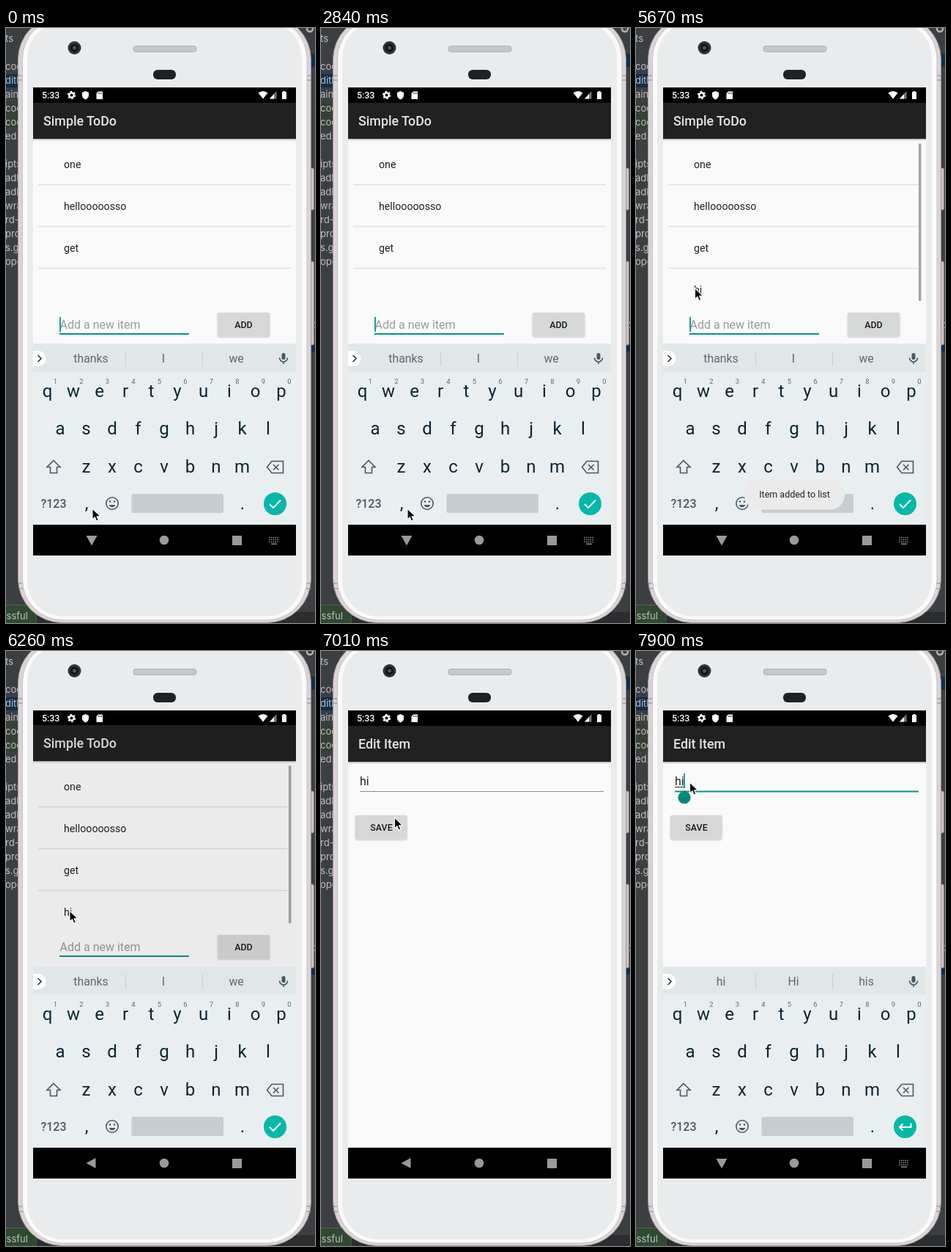
An HTML page for the animation above (8 s loop, 422 px wide and 811 px high).

```html
<!DOCTYPE html>
<html lang="en">
<head>
<meta charset="utf-8">
<title>To-do list on a phone</title>
<style>
  html, body { margin: 0; width: 100%; height: 100%; overflow: hidden; background: #3c3f41; }
  svg { display: block; width: 100%; height: 100%; font-family: Roboto, sans-serif; }
  .mid { text-anchor: middle; }
  .bold { font-weight: 500; }
  .line { fill: none; stroke: #455a64; stroke-width: 1.6; }
  #ide text { font: 13px Inter, sans-serif; fill: #bdbfc1; }
  #list text { font-size: 14.2px; fill: #212121; }
  .field { font-size: 16px; fill: #212121; }
  .button { font-size: 12.4px; font-weight: 500; fill: #1b1b1b; text-anchor: middle; }
  .title { font-size: 17.85px; font-weight: 500; fill: #e4e4e4; }
  #letters { font-size: 24px; fill: #0b2531; text-anchor: middle; }
  #digits { font-size: 9.5px; fill: #5f6d75; text-anchor: middle; }
  #words { font-size: 15.8px; fill: #5c6970; text-anchor: middle; }
</style>
</head>
<body>
<svg viewBox="0 0 422 811">
  <defs>
    <linearGradient id="shade" x2="0" y2="1">
      <stop stop-opacity=".28"/><stop offset="1" stop-opacity="0"/>
    </linearGradient>
    <filter id="lift" x="-10%" y="-20%" width="120%" height="150%">
      <feDropShadow dx="0" dy="1" stdDeviation="1" flood-opacity=".25"/>
    </filter>
    <clipPath id="screen"><rect x="37" y="81" width="359" height="638"/></clipPath>
    <clipPath id="reveal"><rect id="revealBox" x="37" width="359" height="700"/></clipPath>
  </defs>

  <g id="ide">
    <rect width="422" height="811" fill="#3c3f41"/>
    <path d="M0 63h30v18H0zM410 35h12v18h-12zM410 432h12v9h-12z" fill="#0d2f4d"/>
    <path d="M0 100h30v37H0z" fill="#344134"/>
    <rect x="-1" y="786.500" width="43" height="30" fill="#2f4a2f" stroke="#55605a"/>
    <path d="M42 796h380v15H42z" fill="#2b2d2f"/>
    <circle cx="415" cy="1" r="4" fill="none" stroke="#b0b3b5" stroke-width="2.500"/>
    <text x="417" y="409">c</text>
    <text x="-7" y="806">essful</text>
  </g>

  <g id="phone">
    <rect x="411" y="191" width="9.500" height="57" rx="2" fill="#c9c3c4" stroke="#8b8587"/>
    <rect x="411" y="318" width="9.500" height="114" rx="2" fill="#c9c3c4" stroke="#8b8587"/>
    <rect x="16.500" y="-17" width="400" height="827.500" rx="60" fill="#dcd3d6" stroke="#a39a9d"/>
    <path d="M17 65h7M17 71h7M410 65h7M410 71h7M17 757h7M17 764h7M410 757h7M410 764h7" stroke="#8a8285"/>
    <rect x="22.500" y="-13" width="388.500" height="820" rx="55" fill="#fafafa" stroke="#cbc3c6"/>
    <rect x="29" y="-8" width="375" height="810" rx="49" fill="#e9ebec"/>
    <circle cx="93.500" cy="27" r="9" fill="#303234"/>
    <circle cx="93.500" cy="27" r="5.500" fill="#111418"/>
    <circle cx="93.500" cy="27" r="2.500" fill="#4b5562"/>
    <rect x="174" y="24.500" width="86" height="8" rx="3.500" fill="#c7c8ca" stroke="#aeb0b2"/>
    <rect x="201" y="57" width="31" height="13" rx="6" fill="#202124"/>
  </g>

  <g clip-path="url(#screen)">
    <path d="M37 81h359v638H37z"/>
    <g id="main">
      <path d="M37 151h359v540H37z" fill="#fafafa"/>
      <path d="M37 102h359v49H37z" fill="#212121"/>
      <path d="M37 151h359v3H37z" fill="url(#shade)"/>
      <text class="title" x="51" y="133">Simple ToDo</text>
      <g id="list">
        <text x="79" y="191">one</text>
        <text x="79" y="248">hellooooosso</text>
        <text x="79" y="305">get</text>
        <path d="M44 213.500h345M44 270.500h345M44 327.500h345" stroke="#e0e0e0" stroke-width="1.500"/>
        <g id="added">
          <text x="79" y="361.500">hi</text>
          <path d="M386 157.500h3.500v214.500H386z" fill="#a5a5a5"/>
        </g>
      </g>
      <text class="field" id="entry" x="73.500" y="410"></text>
      <path id="composing" d="M74 412.500h11.500" stroke="#333"/>
      <path d="M73 417h177" stroke="#009688" stroke-width="1.800"/>
      <path id="caret" stroke="#009688" stroke-width="1.800"/>
      <rect id="add" x="289" y="388" width="71" height="32.500" rx="2" filter="url(#lift)"/>
      <text class="button" x="324.500" y="409">ADD</text>
      <rect id="dim" x="37" y="102" width="359" height="589"/>
    </g>

    <g clip-path="url(#reveal)">
      <g id="edit">
        <path d="M37 151h359v540H37z" fill="#fafafa"/>
        <path d="M37 102h359v49H37z" fill="#212121"/>
        <path d="M37 151h359v3H37z" fill="url(#shade)"/>
        <text class="title" x="51" y="133">Edit Item</text>
        <text class="field" x="53" y="183">hi</text>
        <path id="editLine" d="M53 191.500h333"/>
        <rect x="47" y="224" width="70.500" height="32.500" rx="2" fill="#d6d7d7" filter="url(#lift)"/>
        <text class="button" x="82.500" y="245">SAVE</text>
        <g id="editFocus">
          <path d="M53 185.500h12" stroke="#333"/>
          <path d="M66 167v20" stroke="#009688" stroke-width="1.800"/>
          <path id="handle" d="M66 190l6 3.500a8.600 8.600 0 1 1-12 0z" fill="#00897b"/>
        </g>
      </g>
    </g>

    <g id="keyboard">
      <path d="M37 430.500h359V678H37z" fill="#e9eef1"/>
      <path d="M37 430.500h359V469H37z" fill="#e1e6e9"/>
      <path d="M37 440h7a10.500 10.500 0 0 1 0 21h-7z" fill="#fff"/>
      <path d="M43.500 446l4.500 4.500-4.500 4.500" class="line" style="stroke:#263238"/>
      <path d="M163.500 440v21M268.500 440v21" stroke="#c8ced2"/>
      <g id="words"></g>
      <rect x="376.500" y="443" width="5" height="9" rx="2.500" fill="#455a64"/>
      <path d="M373.500 449.500a5.500 5.500 0 0 0 11 0M379 455v3" class="line"/>
      <g id="letters"></g>
      <g id="digits"></g>
      <path d="M65 589.500l9 9h-4.500v8h-9v-8H56z" class="line"/>
      <path d="M363 590.500h15.500v16H363l-6.500-8zM365 595l7.500 7.500M372.500 595l-7.500 7.500" class="line"/>
      <text class="mid bold" x="65" y="654" font-size="16" fill="#455a64">?123</text>
      <circle cx="145" cy="648" r="8.200" class="line"/>
      <circle cx="142" cy="645.500" r="1.300" fill="#455a64"/>
      <circle cx="148" cy="645.500" r="1.300" fill="#455a64"/>
      <path d="M140.500 650a4.800 4.800 0 0 0 9 0z" fill="#455a64"/>
      <rect x="171.500" y="635" width="125.500" height="26" rx="2" fill="#c8cdd1"/>
      <circle cx="367.500" cy="648.500" r="15.500" fill="#04b9a9"/>
      <path id="enter" fill="none" stroke="#fff" stroke-width="2"/>
    </g>

    <g id="toast">
      <rect x="148" y="614.500" width="137" height="42" rx="20" fill="#ebebeb"/>
      <text class="mid" x="216.500" y="640" font-size="12.500" fill="#222">Item added to list</text>
    </g>

    <path d="M37 677h359v42H37z"/>
    <path id="back" fill="#9a9a9a"/>
    <circle cx="216" cy="698" r="6.300" fill="#9a9a9a"/>
    <path d="M309 692h13v13h-13z" fill="#9a9a9a"/>
    <g id="switcher" fill="none" stroke="#8a8a8a" stroke-width="1.500" stroke-dasharray="1.600 1.200">
      <path d="M359 694.500h14M359 697.500h14M359 700.500h14"/>
      <path d="M362 703.300h8" stroke-dasharray="none"/>
    </g>

    <g id="status" fill="#fff">
      <text class="bold" x="49" y="96" font-size="12.400">5:33</text>
      <circle cx="89.500" cy="91.500" r="3.200" fill="none" stroke="#fff" stroke-width="2.400"/>
      <circle cx="89.500" cy="91.500" r="4.900" fill="none" stroke="#fff" stroke-width="1.600" stroke-dasharray="2.500 2.630"/>
      <path d="M108.500 86l4.500 2v3.500q0 4-4.500 6-4.500-2-4.500-6V88z"/>
      <path d="M126 86.500h6v10.500h-8.500V89z"/>
      <path d="M126.500 88v2M128.500 88v2M130.500 88v2" stroke="#000" stroke-width=".8"/>
      <path d="M344.500 88.500q6.500-5 13 0L351 96.500z"/>
      <path d="M369.500 86v10.500H360z" fill="#777"/>
      <path d="M366 90v6.500h-6z"/>
      <path d="M377 87.300h1.500V86h3v1.300h1.500V97h-6z"/>
    </g>
  </g>

  <path id="pointer" d="M0 0v14.800l3.400-3.100 2.300 5.400 2.600-1.100-2.200-5.300h4.700z" stroke="#fff" stroke-width="1.100"/>
</svg>

<script>
const LOOP = 8000, TICK = 149;
const $ = id => document.getElementById(id);
const set = (id, attrs) => { for (const k in attrs) $(id).setAttribute(k, attrs[k]); };
const show = (id, on) => { $(id).style.display = on ? '' : 'none'; };

function addText(parent, x, y, content) {
  const node = document.createElementNS('http://www.w3.org/2000/svg', 'text');
  node.setAttribute('x', x);
  node.setAttribute('y', y);
  node.textContent = content;
  $(parent).append(node);
  return node;
}

// Clipped project tree left of the phone
['ts', '', 'coo', 'dith', 'ain', 'coo', 'coo', 'ed.J', '', 'ipts', 'adl', 'adl', 'wra', 'rd-', 'pro', 's.gr', 'ope']
  .forEach((label, i) => addText('ide', -1, 19 + i * 19, label));

[['qwertyuiop', 56.5, 503], ['asdfghjkl', 74, 554], ['zxcvbnm', 109.5, 605.5]].forEach(([row, x, y]) =>
  [...row].forEach((key, i) => addText('letters', x + i * 35.5, y, key)));
addText('letters', 110, 656, ',');
addText('letters', 323, 656, '.');
for (let i = 0; i < 10; i++) addText('digits', 67.5 + i * 35.5, 485, (i + 1) % 10);
const words = [116, 215, 314.5].map(x => addText('words', x, 456, ''));

// Times below are in ticks; each path is a list of [tick, ...values]
const pointerPath = [
  [24, 118, 655], [25, 142, 628], [26, 210, 540], [27, 284, 432], [28, 306.5, 409.5],
  [32, 306.5, 409.5], [33, 265, 400], [34, 140, 374], [35, 35, 350], [36, 62, 356],
  [37, 83, 355], [38, 80.5, 354.5], [39, 80.5, 354.5], [41, 87, 354],
  [44, 87, 354], [45, 92, 318], [46, 98, 250], [47, 100.5, 227], [48, 95, 206], [50, 73.5, 179]
];
const toastPath = [[30, 0], [32, .8], [33, 1], [39, 1], [41, 0]];
const mainPath = [[41, 0, 0], [42, -1, .06], [43, -11, .1]];
const editPath = [[42, 26, 677], [43, 8, 215], [44, 0, 102]];
const keyboardPath = [[42, 0, 1], [43, 60, .5], [44, 247, 0], [50, 247, 0], [51, 60, .6], [52, 0, 1]];
const caretFlips = [2, 5, 9, 12, 15, 19, 22, 23, 26, 30, 34, 37, 40];

function along(path, tick) {
  const next = path.findIndex(p => p[0] > tick);
  if (next === 0) return path[0].slice(1);
  if (next < 0) return path[path.length - 1].slice(1);
  const a = path[next - 1], b = path[next], f = (tick - a[0]) / (b[0] - a[0]);
  return a.slice(1).map((v, i) => v + (b[i + 1] - v) * f);
}

function draw(now) {
  const tick = Math.floor((now % LOOP + 6) / TICK);
  const typed = tick >= 23 && tick < 31;
  const editing = tick >= 50;
  const keyboardUp = tick < 42 || tick >= 51;

  $('entry').textContent = typed ? 'hi' : 'Add a new item';
  set('entry', { style: `fill:${typed ? '#212121' : '#9b9b9b'}` });
  show('composing', typed);
  show('caret', caretFlips.filter(flip => flip <= tick).length % 2 === 0);
  set('caret', { d: `M${typed ? 86.5 : 74} 394v20` });
  set('add', { fill: tick === 30 ? '#bebfbf' : '#d6d7d7' });
  show('added', tick >= 31);

  const [mainY, dim] = along(mainPath, tick);
  set('main', { transform: `translate(0 ${mainY})` });
  set('dim', { opacity: dim });
  show('main', tick < 44);
  const [editY, revealY] = along(editPath, tick);
  set('edit', { transform: `translate(0 ${editY})` });
  set('revealBox', { y: revealY });
  show('edit', tick >= 43);
  set('editLine', { stroke: editing ? '#009688' : '#8c8c8c', 'stroke-width': editing ? 1.8 : 1 });
  show('editFocus', editing);
  show('handle', tick >= 51);

  const [keyboardY, keyboardAlpha] = along(keyboardPath, tick);
  set('keyboard', { transform: `translate(0 ${keyboardY})`, opacity: keyboardAlpha });
  const choices = typed || editing ? ['hi', 'Hi', 'his'] : ['thanks', 'I', 'we'];
  words.forEach((word, i) => word.textContent = choices[i]);
  set('enter', {
    d: editing ? 'M375.500 643.500v5.500H360.500M364.500 644.500l-4.500 4.500 4.500 4.500' : 'M360 649l5 5 10-10.500'
  });
  set('toast', { opacity: along(toastPath, tick)[0] });

  set('back', { d: keyboardUp ? 'M109.500 692h15l-7.500 13.500z' : 'M109.500 698l13-7v14z' });
  show('switcher', keyboardUp);
  set('pointer', { transform: `translate(${along(pointerPath, tick)})` });
}

const start = performance.now();
function loop() {
  draw(performance.now() - start);
  requestAnimationFrame(loop);
}
loop();
</script>
</body>
</html>
```
